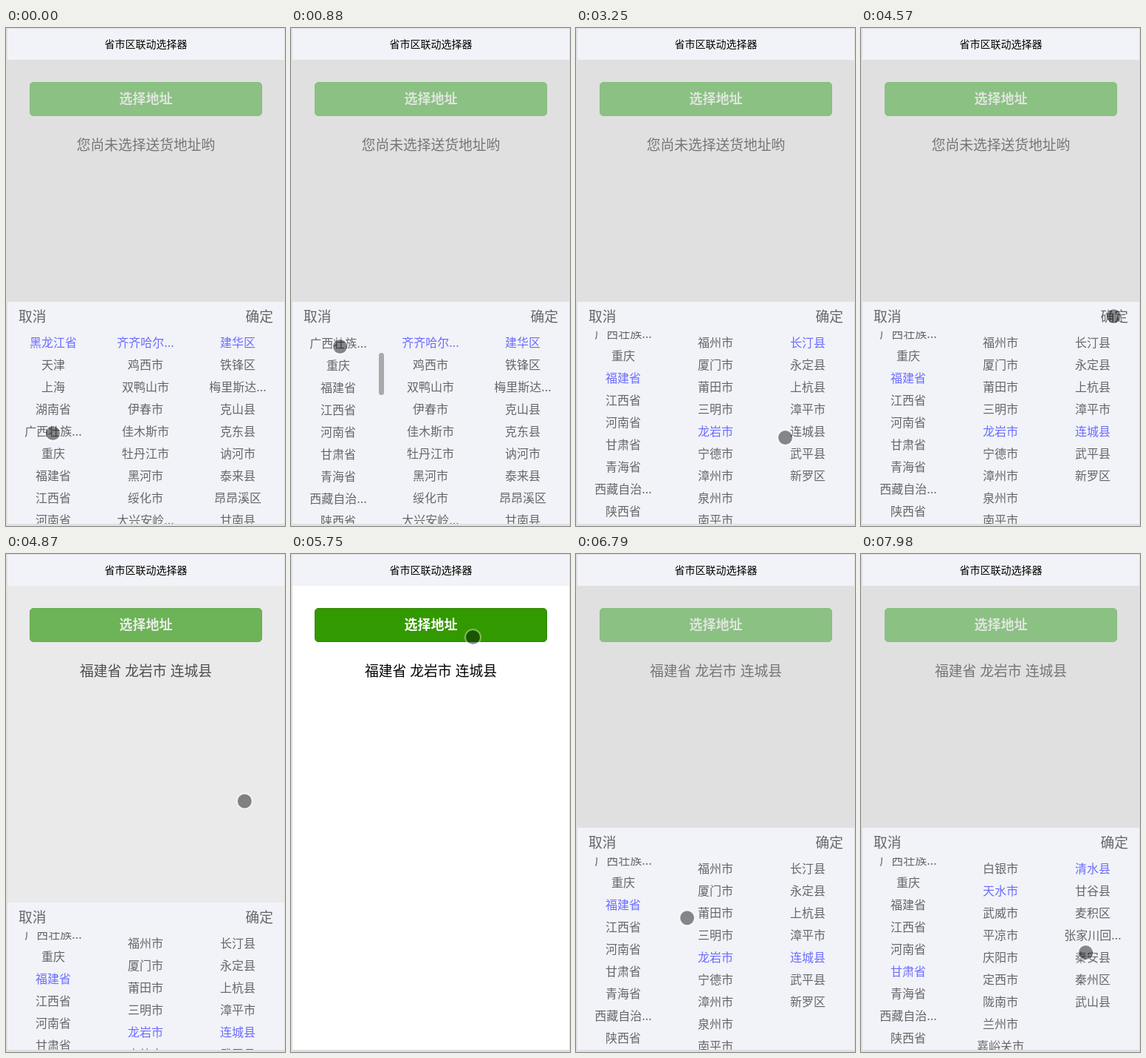
Recreate the animation shown at these times as an HTML page. Size 378 by 673 pixels, loop 8000 ms.

```html
<!DOCTYPE html>
<html lang="zh-CN">
<head>
<meta charset="utf-8">
<title>省市区联动选择器</title>
<style>
html, body { margin: 0; width: 100%; height: 100%; overflow: hidden; background: #e0e0e1; }
body { position: relative; font-family: "Noto Sans CJK SC", "Noto Sans CJK", sans-serif; }
#phone {
  --dim: 100%;
  position: absolute; left: 2px; top: 1px; width: 375px; height: 669px; overflow: hidden;
  background: color-mix(in srgb, #e0e0e0 var(--dim), #fff);
}
#phone div { position: absolute; box-sizing: border-box; white-space: pre; }
#title { left: 0; top: 0; width: 375px; height: 42px; background: #f2f3f8; color: #000; font-size: 14px; line-height: 40px; text-align: center; }
#button {
  left: 30px; top: 72px; width: 315px; height: 46px; border-radius: 5px;
  border: 1px solid color-mix(in srgb, #86bd7d var(--dim), #2b8500);
  background: color-mix(in srgb, #8bc183 var(--dim), #339900);
  color: color-mix(in srgb, #e0e3df var(--dim), #fff);
  font-size: 18px; font-weight: bold; line-height: 40px; text-align: center;
}
#address {
  left: 0; top: 137px; width: 375px; font-size: 18.75px; line-height: 38px; word-spacing: 1px; text-align: center;
  color: color-mix(in srgb, #757575 var(--dim), #000);
}
#panel { left: 0; top: 369px; width: 375px; height: 300px; background: #f1f3f8; color: #666668; }
.action { top: 0; font-size: 18.75px; line-height: 38px; }
#lists { left: 0; top: 40px; width: 375px; height: 260px; overflow: hidden; }
.column { top: -1px; width: 124px; font-size: 16px; line-height: 30px; text-align: center; }
#phone .column div { position: static; height: 30px; }
.column .on { color: #6c6cff; }
#bar { left: 117px; top: 0; width: 7px; height: 57px; border-radius: 4px; background: #a9a9ac; }
#touch {
  position: absolute; left: -11.5px; top: -11.5px; width: 23px; height: 23px; box-sizing: border-box;
  border: 2px solid rgba(255,255,255,.35); border-radius: 50%;
  background: rgba(0,0,0,.45) padding-box;
}
</style>
</head>
<body>
<div id="phone">
  <div id="button">选择地址</div>
  <div id="address"></div>
  <div id="title">省市区联动选择器</div>
  <div id="panel">
    <div class="action" style="left:15px">取消</div>
    <div class="action" style="right:15px">确定</div>
    <div id="lists">
      <div class="column" style="left:0"></div>
      <div class="column" style="left:125px"></div>
      <div class="column" style="left:250px"></div>
      <div id="bar"></div>
    </div>
  </div>
</div>
<div id="touch"></div>
<script>
const LOOP = 8000;
const FRAME = 147.6; // the screen refreshes at this interval
const TAP = 300;     // a tap rests this long, then takes effect
const SLIDE = 380;   // panel opening or closing
const DRAG = 1300;   // scroll of the first list, with momentum

const $ = id => document.getElementById(id);
const columns = [...document.querySelectorAll('.column')];
const words = text => text.split(' ');
const clamp = value => Math.min(1, Math.max(0, value));
const easeOut = part => 1 - (1 - part) ** 2;

const provinces = words('黑龙江省 天津 上海 湖南省 广西壮族... 重庆 福建省 江西省 河南省 甘肃省 青海省 西藏自治... 陕西省 贵州省');
const cities = {
  黑龙江省: words('齐齐哈尔... 鸡西市 双鸭山市 伊春市 佳木斯市 牡丹江市 黑河市 绥化市 大兴安岭...'),
  河南省: words('平顶山市 鹤壁市 许昌市 三门峡市 驻马店市 济源市 焦作市 南阳市 郑州市'),
  福建省: words('福州市 厦门市 莆田市 三明市 龙岩市 宁德市 漳州市 泉州市 南平市'),
  甘肃省: words('白银市 天水市 武威市 平凉市 庆阳市 定西市 陇南市 兰州市 嘉峪关市'),
};
const districts = {
  '齐齐哈尔...': words('建华区 铁锋区 梅里斯达... 克山县 克东县 讷河市 泰来县 昂昂溪区 甘南县'),
  平顶山市: words('新华区 卫东区 叶县 郏县 石龙区 汝州市 宝丰县 鲁山县 舞钢市'),
  福州市: words('鼓楼区 台江区 仓山区 马尾区 晋安区 闽侯县 连江县 罗源县 闽清县'),
  龙岩市: words('长汀县 永定县 上杭县 漳平市 连城县 武平县 新罗区'),
  白银市: words('白银区 平川区 靖远县 会宁县 景泰县'),
  天水市: words('清水县 甘谷县 麦积区 张家川回... 秦安县 秦州区 武山县'),
};

// Where the finger goes and what each tap changes
const stops = [
  { at: 0, x: 63, y: 547, rest: 0 },
  { at: 900, x: 66, y: 430, rest: 0 },
  { at: 1470, x: 69, y: 533, set: { province: '河南省' } },
  { at: 2060, x: 70, y: 474, set: { province: '福建省' } },
  { at: 2800, x: 189, y: 547, set: { city: '龙岩市' } },
  { at: 3400, x: 316, y: 555, set: { district: '连城县' } },
  { at: 4500, x: 342, y: 389, set: { open: false, address: '福建省 龙岩市 连城县' } },
  { at: 5470, x: 246, y: 112, set: { open: true, scroll: 131 } },
  { at: 6500, x: 72, y: 562, rest: 130, set: { province: '甘肃省' } },
  { at: 7007, x: 189, y: 456, set: { city: '天水市' } },
  { at: 7960, x: 304, y: 538 },
];

function stateAt(time) {
  const state = { province: '黑龙江省', open: true, movedAt: -SLIDE, scroll: 132, address: '您尚未选择送货地址哟' };
  for (const { at, set } of stops) {
    if (!set || at + TAP > time) continue;
    if (set.province) state.city = state.district = undefined;
    if (set.city) state.district = undefined;
    if ('open' in set) state.movedAt = at + TAP;
    Object.assign(state, set);
  }
  state.city ??= cities[state.province][0];
  state.district ??= districts[state.city][0];
  return state;
}

function touchAt(time) {
  const next = stops.findIndex(stop => stop.at > time);
  if (next < 0) return stops[stops.length - 1];
  const a = stops[next - 1], b = stops[next];
  const leave = a.at + (a.rest ?? TAP);
  const part = easeOut(clamp((time - leave) / (b.at - leave)));
  return { x: a.x + (b.x - a.x) * part, y: a.y + (b.y - a.y) * part };
}

function fill(column, items, selected) {
  column.replaceChildren(...items.map(text => {
    const row = document.createElement('div');
    row.textContent = text;
    if (text === selected) row.className = 'on';
    return row;
  }));
}

let shown;
function showLists({ province, city, district }) {
  const key = province + city + district;
  if (key === shown) return;
  shown = key;
  fill(columns[0], provinces, province);
  fill(columns[1], cities[province], city);
  fill(columns[2], districts[city], district);
}

function render(now) {
  const time = Math.floor((now % LOOP + 8) / FRAME) * FRAME;
  const state = stateAt(time);
  showLists(state);

  const scroll = state.scroll * easeOut(clamp(time / DRAG));
  columns[0].style.transform = `translateY(${-Math.round(scroll)}px)`;
  $('bar').style.transform = `translateY(${scroll * 0.245}px)`;
  $('bar').style.opacity = time > 0 ? clamp((2210 - time) / 290) : 0;

  const moved = easeOut(clamp((time - state.movedAt) / SLIDE));
  const open = state.open ? moved : 1 - moved;
  $('phone').style.setProperty('--dim', `${open * 100}%`);
  $('panel').style.transform = `translateY(${Math.round(300 * (1 - open))}px)`;
  $('address').textContent = state.address;

  const { x, y } = touchAt(time);
  $('touch').style.transform = `translate(${x}px, ${y}px)`;
}

const start = performance.now();
function tick() {
  render(performance.now() - start);
  requestAnimationFrame(tick);
}
tick();
</script>
</body>
</html>
```
